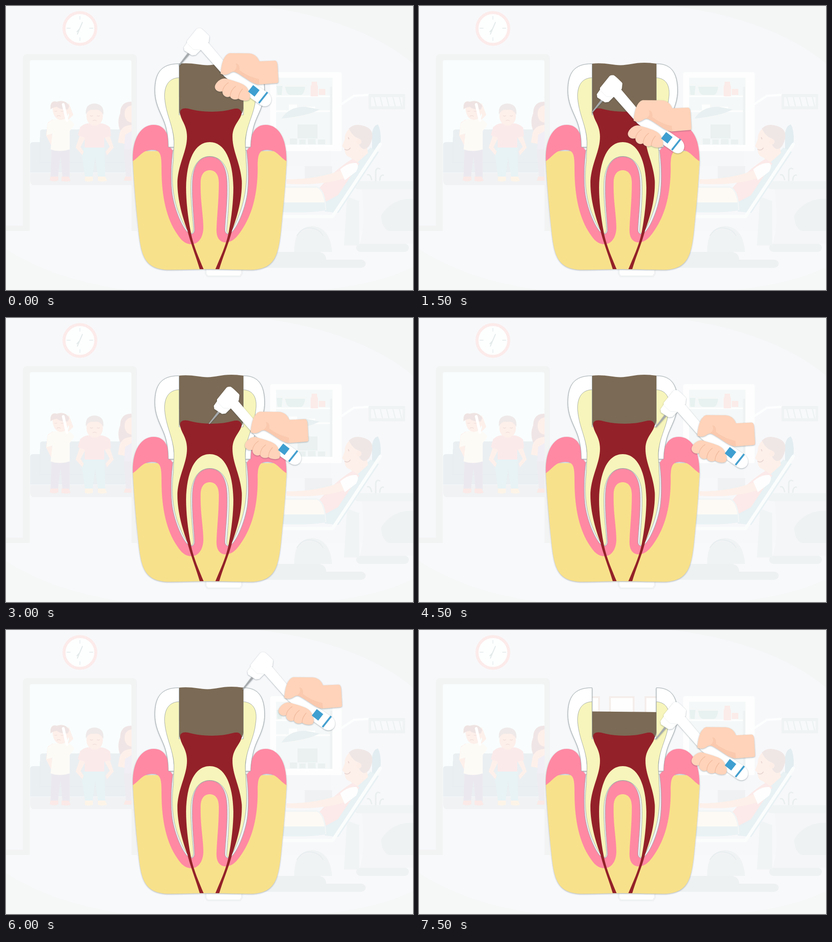
An HTML page for the animation above (8 s loop, 895 by 626 pixels).

```html
<!DOCTYPE html>
<html lang="en">
<head>
<meta charset="utf-8">
<title>Tooth drilling</title>
<style>
  html, body { margin: 0; width: 100%; height: 100%; overflow: hidden; background: #f7f8f9; }
  svg { display: block; width: 100%; height: 100%; }
  .tooth, .tool, .fist { filter: drop-shadow(0 1.5px 1.5px rgba(40, 60, 70, .38)); }
  .edge { stroke: #8f9a9c; stroke-width: .8; }
  .line { fill: none; stroke-linecap: round; stroke-linejoin: round; }
</style>
</head>
<body>
<svg viewBox="0 0 895 626">
  <rect width="895" height="626" fill="#f7f8fa"/>
  <path d="M0 496H895V626H0Z" fill="#f8f9fb"/>
  <path d="M550 0C700 15 830 70 895 128V0Z" fill="#f4f6f6"/>
  <path d="M0 535C60 575 150 610 270 626H0ZM895 575Q820 612 690 626H895Z" fill="#f6f8f8"/>

  <!-- clock -->
  <circle cx="162.500" cy="49.500" r="35" fill="#fdfefe" stroke="#fcebea" stroke-width="6.500"/>
  <path class="line" d="M134 49h7M184 49h7M162.500 23v6M162.500 70v6" stroke="#e8eeee" stroke-width="1.800"/>
  <path class="line" d="M168 36L162 50L156 57M162 50L157 62" stroke="#e3eaea" stroke-width="2"/>

  <!-- doorway -->
  <path d="M0 484H37V116Q37 106 47 106H278Q288 106 288 116V496H0Z" fill="#f2f3f3"/>
  <path d="M52 496V124Q52 119 57 119H271Q276 119 276 124V496Z" fill="#f8f9fa"/>
  <path d="M53 367V124Q53 120 57 120H271Q276 120 276 124V367Z" fill="#f9fdfd"/>
  <path d="M75 277Q75 272 82 272H276V367H53V306Q53 300 60 300H75Z" fill="#eaeff2"/>
  <path d="M75 290V345H276" class="line" stroke="#e5ebef"/>
  <path d="M53 368H276V395H62Q53 395 53 384Z" fill="#f1f2f3"/>

  <!-- waiting patients -->
  <g>
    <path d="M100 317H140V378H124L120 330L114 378H98Z" fill="#ebe9ef"/>
    <path d="M98 376h17v8q-9 5-19 0zM122 376h16l4 9q-10 4-20 0z" fill="#fbe9e7"/>
    <path d="M103 250L92 257L88 285L102 313L108 309L101 286ZM135 253L148 240L138 214L132 228L139 240Z" fill="#fdf0eb"/>
    <path d="M92 259Q105 246 122 250Q143 246 150 262L140 276V316Q118 323 98 316L102 281L89 285Z" fill="#fdfbf6"/>
    <path d="M102 222Q104 212 120 212Q137 214 137 235Q135 251 119 251Q103 248 102 222Z" fill="#fdefea"/>
    <path d="M98 228Q96 207 112 211Q130 205 139 220L136 228Q118 229 112 222Q101 224 98 228Z" fill="#efe4e3"/>
    <path d="M126 217L134 252" class="line" stroke="#fff" stroke-width="6"/>
    <path class="line" d="M107 232h5M121 232h5M112 243q4-3 8 0" stroke="#ecd9d6"/>

    <path d="M172 311H217L218 378H203L196 332L190 378H174L166 322Z" fill="#e7f3f5"/>
    <path d="M174 376h17v9q-10 4-18 0zM202 376h16l4 9q-10 4-20 0z" fill="#fdf4e8"/>
    <path d="M166 274L153 312L168 329L171 321L164 311L177 285ZM224 274L237 312L222 329L219 321L228 310L214 285Z" fill="#fdf0eb"/>
    <path d="M163 267Q176 255 195 260Q215 255 229 268L231 287L216 290V312H173V290L158 285Z" fill="#fbeaea"/>
    <ellipse cx="195" cy="243" rx="18" ry="21" fill="#fdefea"/>
    <path d="M176 239Q173 216 194 215Q217 216 214 240Q207 226 195 229Q181 226 176 239Z" fill="#efe9e9"/>
    <path class="line" d="M185 242q3 2 6 0M200 242q3 2 6 0M191 253q4-3 8 0" stroke="#ecd9d6"/>

    <path d="M276 211Q252 210 251 237Q244 255 250 272Q258 287 276 289Z" fill="#f0e5e6"/>
    <path d="M276 219Q259 222 261 242Q264 256 276 257Z" fill="#fdefea"/>
    <path d="M276 262Q256 263 250 279L246 301L276 307Z" fill="#fdf0eb"/>
    <path d="M276 276L262 284L260 316H276Z" fill="#f1eef5"/>
    <path d="M259 316H276V380H264Z" fill="#eeecf1"/>
    <path d="M262 376H276V385H259Z" fill="#fbe9e7"/>
  </g>

  <!-- wall pictures behind the crown -->
  <g fill="#fefefe" stroke="#f5eeeb" stroke-width="4">
    <path d="M360 148h36v58h-36zM420 148h52v58h-52zM498 148h36v58h-36z"/>
  </g>

  <!-- cabinet -->
  <rect x="581" y="146" width="157" height="174" rx="4" fill="#fefefe"/>
  <path d="M594 158H718V306H594Z" fill="#f5f8f8"/>
  <path d="M594 199H718M594 232H718" stroke="#fcfdfd" stroke-width="4"/>
  <path d="M715 178V306" stroke="#eff2f2" stroke-width="5"/>
  <path d="M595 176h13l-2 20h-9zM614 178H658Q655 196 648 196H624Q616 194 614 178Z" fill="#e8f2f0"/>
  <path d="M672 167h12v6l2 4v22h-16v-22l2-4zM688 183h14v13h-14z" fill="#fbebe9"/>
  <path d="M622 217h18v13h-18zM660 222h20v12h-20z" fill="#fdfefe"/>
  <path d="M670 225v7M666.500 228.500h7" stroke="#fbe2e0" stroke-width="2"/>
  <path d="M641 261H685V292H641ZM624 292h16v13h-16zM645 294h14v11h-14zM664 293h17v12h-17zM686 294h16v11h-16z" fill="#ebf1f1"/>
  <path d="M594 306H718V310H594Z" fill="#fff"/>
  <path d="M606 248Q622 222 658 222L690 228Q665 242 606 248Z" fill="#e9f0f1"/>
  <path d="M657 353H717V389H657Z" fill="#eff1f2"/>
  <path d="M617 320H715V353H617Z" fill="#f5f7f8"/>
  <path class="line" d="M720 228L765 198L797 196" stroke="#fdfefe" stroke-width="5"/>
  <rect x="797" y="194" width="81" height="34" rx="3" fill="#f0f3f4"/>
  <path d="M803 201H872V221H803Z" fill="#f7f9fa"/>
  <path d="M809 201l5 20M823 201l5 20M837 201l5 20M851 201l5 20M865 201l5 20" stroke="#ecf0f1" stroke-width="2"/>

  <!-- sink -->
  <path d="M765 391Q768 386 780 386H895V404H773Q764 402 765 391Z" fill="#f1f4f5"/>
  <path d="M782 404H895V524H778Q792 480 782 404Z" fill="#f4f6f7"/>
  <path d="M895 425Q847 424 825 462Q826 489 842 496H895Z" fill="#eff2f3"/>
  <rect x="770" y="524" width="116" height="18" rx="9" fill="#eff2f3"/>
  <path class="line" d="M813 385V363Q816 355 822 359M795 372Q801 370 804 383M830 373Q823 371 822 384" stroke="#e9eeee" stroke-width="3"/>

  <!-- patient in chair -->
  <path d="M600 542H690Q704 546 704 559H782Q791 561 791 568T782 577H560V542Z" fill="#eef1f2"/>
  <path d="M634 542Q632 490 671 485Q713 486 717 542Z" fill="#f0f3f4"/>
  <path class="line" d="M640 506Q653 485 675 490Q690 493 697 506" stroke="#e8edef" stroke-width="2"/>
  <path d="M750 420L777 430V528H743Z" fill="#f1f4f5"/>
  <path d="M805 280Q808 263 818 261Q825 275 824 298L816 324L805 316Z" fill="#e2edf1"/>
  <path d="M802 312L820 322L731 456L701 453V402Z" fill="#e8f1f4"/>
  <path class="line" d="M823 305L718 464H600" stroke="#fbfdfd" stroke-width="7"/>
  <path d="M755 270Q744 281 745 294L739 309L745 315Q744 331 758 334L769 348L796 324L788 277Z" fill="#fdf0ea"/>
  <path d="M754 270Q767 257 789 265Q811 273 804 296Q798 317 785 315Q772 307 776 292Q762 288 754 270Z" fill="#efe7e6"/>
  <circle cx="776" cy="299" r="6" fill="#fdeee8"/>
  <path class="line" d="M753 290l1 3M745 316q7 4 12-3" stroke="#e8d5d2" stroke-width="2"/>
  <path d="M762 337Q724 359 685 406L704 431L730 417L777 347Z" fill="#fbeae9"/>
  <path d="M742 360Q690 382 617 382V392Q690 397 746 379Z" fill="#fdf0ea"/>
  <path d="M735 360Q752 345 770 346Q778 350 770 365L745 384Z" fill="#fefefe"/>
  <path d="M600 399H684Q702 406 701 434H600Z" fill="#fdfaf5"/>
  <path d="M600 433H701V451Q660 457 600 454Z" fill="#eaf2f4"/>
  <path class="line" d="M600 399H684Q702 407 703 449" stroke="#f1f5f6" stroke-width="3"/>
  <path d="M439 580H519V590L515 596H443L439 590Z" fill="#fefefe" stroke="#f0f2f3" stroke-width="4"/>

  <!-- tooth -->
  <g class="tooth">
    <path id="bone" fill="#f8e18b"/>
    <path fill="#ff89a3" d="M448 362C436 362 428 371 428 390C427 430 434 460 434 490C433 512 422 525 408 525C391 525 383 513 372 496C350 460 342 410 342 360C342 330 341 317 322 317C300 317 294 332 279 342C277 295 295 262 325 262C349 262 358 283 360 310L366 318H530L536 310C538 283 547 262 571 262C601 262 618 295 616.500 342C601 332 595 317 574 317C555 317 553 330 553.500 360C553 410 543 455 522 488C510 507 500 521 483 521C468 521 462 508 463 490C464 460 468 430 468 390C468 371 460 362 448 362Z"/>
    <path id="membrane" class="edge" fill="#f0f4f6"/>
    <path class="edge" fill="#fff" d="M380.500 127.500C341 127 327.500 148 327.500 187C328 222 345 240 352 268C356 285 357 298 357 311H370C370 275 358 240 351 215L380.500 200Z"/>
    <path class="edge" fill="#fff" d="M522 127.500C555 127 568.500 148 568.500 187C568 222 551 240 544 268C540 285 538 298 538 311H526C526 275 538 240 545 215L522 200Z"/>
  </g>
  <path class="edge" fill="#f7f5bb" d="M380.500 158C355 159 347 180 349 205C352 236 363 255 368 284C371 302 368 318 368 340C362 387 368 430 383 464C393 488 402 500 407 501C412 501 413 494 412 485C410 460 405 420 407 385C410 350 426 331.500 448 331.500C470 331.500 488 350 490 385C492 420 488 460 486 485C485 494 485 501 489 501C494 500 502 488 511 464C525 430 532 390 528 340C528 318 524 302 528 284C533 255 546 236 549 205C553 180 547 160 522 158V240H380.500Z"/>
  <path id="decay" fill="#7b6a55"/>
  <path fill="#932129" d="M383 236C382 227 390 224 400 226C430 235 473 235 499 227C509 224 517 227 518 236C516 252 498 262 498 288C498 320 515 345 518.500 385C520 425 508 465 497 495C491 520 478 550 469 580H460.500C473 550 485 525 490 497C496 465 500 430 500 400C499 340 481 300 448 300C415 300 397 340 396 400C396 430 400 465 406 497C411 525 422 550 434.500 580H426C417 550 405 520 399 495C388 465 376 425 377 385C380 345 398 320 398 288C398 262 384 252 383 236Z"/>

  <!-- drill and hand -->
  <g id="drill">
    <g class="tool">
      <path d="M379.500 130.500L401 102L405 105L382 131Z" fill="#a6aaac"/>
      <path d="M426 94L444 80L482 125L558 179L578 193Q587 204 581 215Q573 225 561 219L538 203L480 155Z" fill="#fff"/>
      <path d="M419 51Q421 49 424 49H428Q431 50 446 65Q448 67 447 70L446 79L439 87L430 95L417 108L409 109L392 98L391 91L398 81V77Z" fill="#fff"/>
    </g>
    <path class="line" d="M399 83L412 96L428 97" stroke="#eef0f1" stroke-width="1"/>
    <path d="M556 214L575 190" stroke="#45a0cf" stroke-width="4"/>
    <g class="fist">
      <path fill="#fed3b9" d="M472 149C474 125 480 107 492 104L535 104.500C548 106 554 114 557 122L592 120.500Q596 121 597 130L599 166Q599 170 594 170L557 173C545 173 530 161 516 152C506 146 502 142 495 146C488 151 480 154 472 149Z"/>
      <path fill="#fed3b9" d="M460 182C456 173 471 157 484 160C503 166 522 170 529 179C535 187 540 201 534 207C526 211 514 207 511 204C504 209 493 204 493 199C485 204 475 197 476 188C469 190 463 188 460 182Z"/>
    </g>
    <path fill="#fac9ae" d="M495 146C505 143 510 134 505 127C512 126 514 134 513 141C525 151 542 158 556 161L557 173C545 173 530 161 516 152C506 146 502 143 495 146Z"/>
    <path class="line" stroke="#f1b99d" stroke-width="1.300" d="M476 188Q478 176 489 169M493 199Q493 186 505 177M511 204Q511 193 520 183"/>
    <rect x="-9" y="-9" width="18" height="18" fill="#3f9fd0" transform="translate(545 187) rotate(38)"/>
  </g>
</svg>
<script>
  const $ = id => document.getElementById(id);

  // Closes a left half with its reflection in x = 448.
  function mirror(half) {
    let from, back = '';
    for (const seg of half.split(/(?=[MLC])/)) {
      const pts = seg.slice(1).trim().split(' ').map(p => p.split(',').map(Number));
      if (from) {
        const turned = [...pts.slice(0, -1).reverse(), from];
        back = seg[0] + turned.map(([x, y]) => `${896 - x},${y}`).join(' ') + back;
      }
      from = pts.at(-1);
    }
    return half + back + 'Z';
  }

  const halves = {
    bone: 'M448,320L300,320L279,340C282,400 287,450 292,500C298,550 305,581.5 360,581.5C390,581.5 420,580 448,580',
    membrane: 'M448,318L367,318C364,340 361,380 365.5,415C371,450 388,490 401,500C408,505 414,502 414.5,494' +
      'C414,470 408,430 410,385C412,350 426,332 448,332'
  };
  for (const id in halves) $(id).setAttribute('d', mirror(halves[id]));

  const STEP = 1500, LOOP = 8000;
  const poses = [[0, 0], [0, 103.5], [66, 102.5], [140, 110], [140, 0], [140, 110]];
  const decayTop = [
    'M381 127C405 124 425 130 443 130.5C465 130 482 121 522 127',
    'M381 179.5L522 181'
  ];

  function draw(t) {
    const i = Math.floor(t % LOOP / STEP);
    $('drill').setAttribute('transform', `translate(${poses[i]})`);
    $('decay').setAttribute('d', decayTop[i === 5 ? 1 : 0] + 'L522 226Q520 240 513 240H384Q381 238 381 230Z');
  }

  const start = performance.now();
  function tick() {
    draw(performance.now() - start);
    requestAnimationFrame(tick);
  }
  tick();
</script>
</body>
</html>
```
